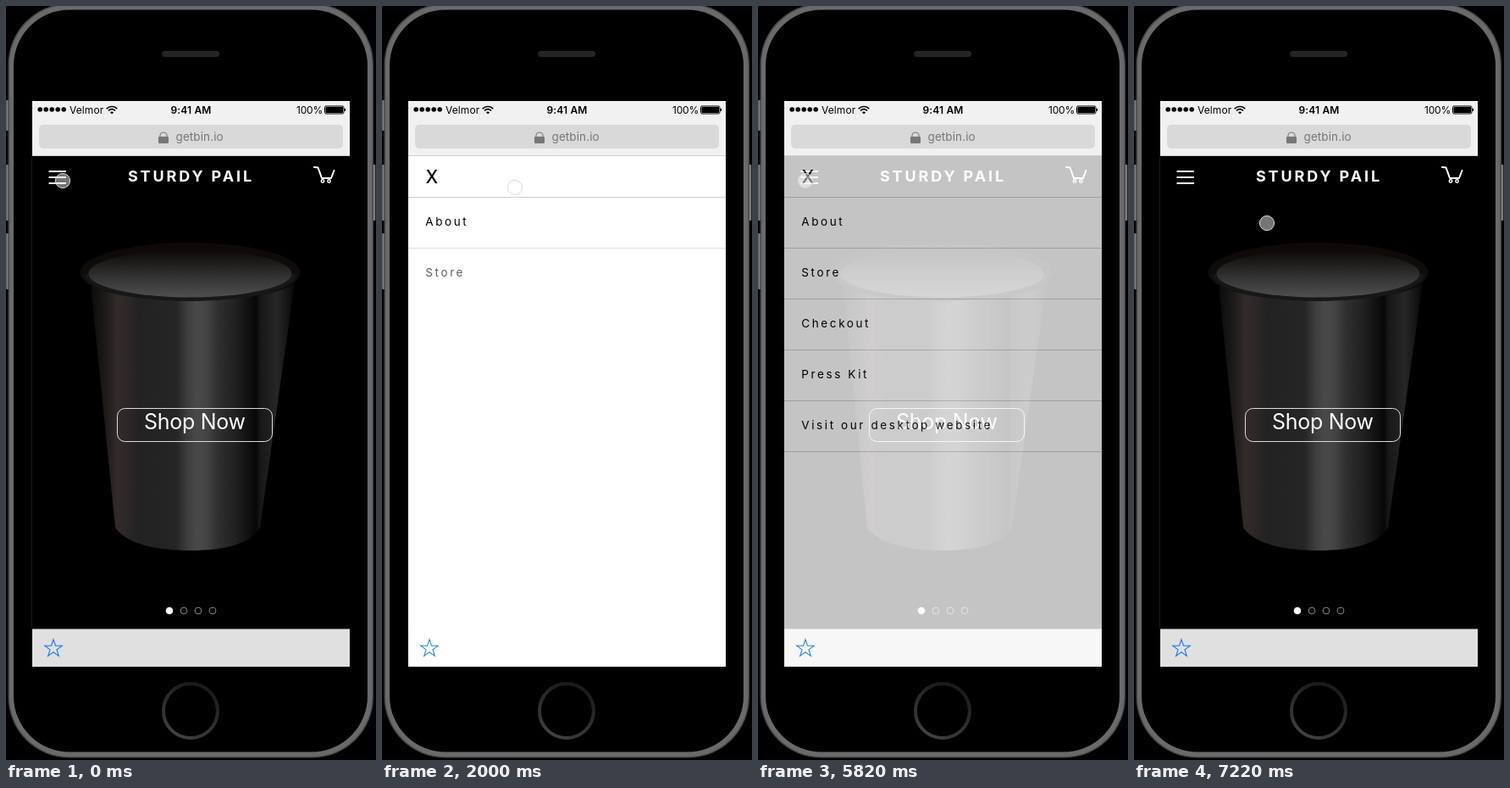
These frames come from a looping animation (437x889 px, 7280 ms). An HTML page with a canvas:

```html
<!DOCTYPE html>
<html lang="en">
<head>
<meta charset="utf-8">
<title>Mobile menu</title>
<style>
html, body { margin: 0; width: 100%; height: 100%; overflow: hidden; background: #000; }
canvas { display: block; width: 437px; height: 889px; }
</style>
</head>
<body>
<canvas id="stage"></canvas>
<script>
const W = 437, H = 889, LOOP = 7280;
const dpr = window.devicePixelRatio || 1;

function prepare(canvas) {
  canvas.width = W * dpr;
  canvas.height = H * dpr;
  const context = canvas.getContext('2d');
  context.scale(dpr, dpr);
  return context;
}

const stage = prepare(document.getElementById('stage'));
const layer = prepare(document.createElement('canvas'));
let ctx = stage;

const SANS = 'Inter, Roboto, sans-serif';
const ITEMS = ['About', 'Store', 'Checkout', 'Press Kit', 'Visit our desktop website'];

const part = (t, start, length) => Math.min(1, Math.max(0, (t - start) / length));
const smooth = p => p * p * (3 - 2 * p);
const cubic = p => p < 0.5 ? 4 * p ** 3 : 1 - 4 * (1 - p) ** 3;
const mix = (a, b, p) => a + (b - a) * p;

function rect(x, y, w, h, color) {
  ctx.fillStyle = color;
  ctx.fillRect(x, y, w, h);
}

function round(x, y, w, h, r, fill, stroke) {
  ctx.beginPath();
  ctx.roundRect(x, y, w, h, r);
  paint(fill, stroke, 1);
}

function circle(x, y, r, fill, stroke, width = 1) {
  ctx.beginPath();
  ctx.arc(x, y, r, 0, Math.PI * 2);
  paint(fill, stroke, width);
}

function oval(x, y, rx, ry, fill) {
  ctx.beginPath();
  ctx.ellipse(x, y, rx, ry, 0, 0, Math.PI * 2);
  paint(fill);
}

function paint(fill, stroke, width) {
  if (fill) { ctx.fillStyle = fill; ctx.fill(); }
  if (stroke) { ctx.strokeStyle = stroke; ctx.lineWidth = width; ctx.stroke(); }
}

function text(str, x, y, size, color, weight = 400, spacing = 0) {
  ctx.font = `${weight} ${size}px ${SANS}`;
  ctx.letterSpacing = spacing + 'px';
  ctx.fillStyle = color;
  ctx.fillText(str, x, y);
}

function gradient(x0, y0, x1, y1, stops) {
  const g = ctx.createLinearGradient(x0, y0, x1, y1);
  for (const [at, color] of stops) g.addColorStop(at, color);
  return g;
}

function phone() {
  rect(0, 0, W, H, '#000');
  const metal = x => gradient(x, 0, x + 4, 0, [[0, '#555'], [0.5, '#8a8a8a'], [1, '#555']]);
  round(0, 111, 4, 36, 1, metal(0));
  round(0, 187, 4, 66, 1, metal(0));
  round(0, 268, 4, 66, 1, metal(0));
  round(432.5, 187, 4, 66, 1, metal(432.5));
  round(2.5, -3, 431.5, 889.5, 72, '#484848');
  round(4, -1.5, 428.5, 886.5, 70.5, '#6a6a6a');
  round(9, 4.5, 418, 875, 66, '#000');
  round(184, 53, 68, 7, 3.5, '#262626');
  circle(218, 831, 32, null,
    gradient(232, 799, 204, 863, [[0, '#191919'], [0.5, '#2b2b2b'], [1, '#414141']]), 4);
}

function browser() {
  rect(31, 112, 375, 64, '#f1f1f1');
  rect(31, 176, 375, 1, '#cacaca');
  for (let i = 0; i < 5; i++) circle(40.2 + i * 7, 122, 2.8, '#000');
  text('Velmor', 75, 126.5, 12, '#000', 400, 0.1);
  text('9:41 AM', 194.5, 126.5, 12, '#000', 600, 0.15);
  text('100%', 343, 126.5, 12, '#000', 400, -0.2);

  // wifi fan
  ctx.save();
  ctx.beginPath();
  ctx.moveTo(125, 127.5);
  ctx.lineTo(116, 118.5);
  ctx.lineTo(116, 114);
  ctx.lineTo(134, 114);
  ctx.lineTo(134, 118.5);
  ctx.clip();
  for (const r of [8.5, 5.3]) circle(125, 127, r, null, '#000', 1.7);
  circle(125, 127, 2.6, '#000');
  ctx.restore();

  round(376.5, 118, 22.5, 9, 1.5, null, '#000');
  rect(377.5, 119, 20.5, 7, '#000');
  rect(399.5, 121, 1.5, 3, '#000');

  round(39, 140, 359, 28, 5, '#d9d9d9');
  round(180, 154, 12, 8, 1, '#777');
  ctx.beginPath();
  ctx.moveTo(182, 155);
  ctx.lineTo(182, 153);
  ctx.arc(186, 153, 4, Math.PI, 0);
  ctx.lineTo(190, 155);
  paint(null, '#777', 1.2);
  text('getbin.io', 200.5, 159.3, 13.5, '#777', 400, 0.1);
}

function star(color) {
  ctx.beginPath();
  for (let i = 0; i < 10; i++) {
    const r = i % 2 ? 4.2 : 10.8, a = i * Math.PI / 5 - Math.PI / 2;
    ctx.lineTo(56 + r * Math.cos(a), 757.6 + r * Math.sin(a));
  }
  ctx.closePath();
  paint(null, color, 1.1);
}

function cup() {
  oval(217.5, 314, 130, 35, gradient(0, 279, 0, 349,
    [[0, '#0f0907'], [0.5, '#0e0c0b'], [1, '#1c1c1c']]));
  ctx.beginPath();
  ctx.moveTo(100, 328);
  ctx.lineTo(129, 615);
  ctx.bezierCurveTo(142, 634, 178, 642, 218, 642);
  ctx.bezierCurveTo(258, 642, 290, 634, 300, 615);
  ctx.lineTo(341, 326);
  ctx.bezierCurveTo(310, 354, 130, 354, 100, 328);
  paint(gradient(100, 0, 341, 0, [
    [0, '#0b0b0b'], [0.08, '#1f1c1b'], [0.13, '#322b29'], [0.18, '#2c2827'],
    [0.24, '#222'], [0.42, '#252525'], [0.47, '#3c3c3c'], [0.52, '#494949'],
    [0.57, '#444'], [0.62, '#303030'], [0.71, '#202020'], [0.77, '#111'],
    [0.81, '#070707'], [0.83, '#171717'], [0.91, '#262626'], [0.96, '#171717'], [1, '#070707']
  ]));
  // front lip over the body
  ctx.save();
  ctx.beginPath();
  ctx.rect(88, 316, 260, 40);
  ctx.clip();
  oval(217.5, 315, 125, 33, '#171717');
  ctx.restore();
  oval(217.5, 315.5, 120, 28, gradient(0, 287, 0, 343,
    [[0, '#0b0807'], [0.3, '#1f1d1c'], [0.65, '#383838'], [1, '#4e4e4e']]));
}

function cart() {
  ctx.lineCap = ctx.lineJoin = 'round';
  ctx.beginPath();
  ctx.moveTo(364, 190);
  ctx.lineTo(368.5, 190.5);
  ctx.lineTo(373, 203);
  ctx.lineTo(384, 203);
  ctx.lineTo(387.5, 194);
  paint(null, '#fff', 2);
  ctx.lineCap = 'butt';
  ctx.lineJoin = 'miter';
  for (const x of [374, 381.5]) circle(x, 206.5, 1.7, null, '#fff', 1.5);
}

function home() {
  rect(31, 176, 375, 559, '#000');
  rect(30, 177, 1, 558, '#151515');
  cup();
  for (const y of [194, 201, 208]) rect(50.5, y, 20.5, 2, '#fff');
  text('STURDY PAIL', 144, 207, 18, '#fff', 700, 2.9);
  cart();
  round(131.5, 474.5, 183, 39, 9, null, '#dcdcdc');
  text('Shop Now', 163, 499, 25, '#fff', 400, -0.3);
  circle(193, 713, 4.3, '#fff');
  for (const x of [210, 227, 244]) circle(x, 713, 3.9, null, '#8a8a8a');
  rect(31, 734.5, 375, 44.5, '#e0e0e0');
  star('#1478f5');
}

function menu(t) {
  rect(31, 176, 375, 603, '#fff');
  rect(31, 176, 375, 1, '#cfcfcf');
  star('#2f86dc');
  text('X', 51.5, 209, 21, '#000', 500);
  for (let i = 0; i < 6; i++) {
    ctx.globalAlpha = smooth(part(t, 1130 + i * 600, 460));
    rect(31, 225 + i * 60, 375, 1, '#cfcfcf');
    if (ITEMS[i]) text(ITEMS[i], 51.3, 259.3 + i * 60, 13.5, '#000', 400, 2.6);
  }
  ctx.globalAlpha = 1;
}

// The menu fades as one flat picture.
function fadeMenu(t, alpha) {
  ctx = layer;
  menu(t);
  ctx = stage;
  ctx.globalAlpha = alpha;
  ctx.drawImage(layer.canvas, 0, 0, W, H);
  ctx.globalAlpha = 1;
}

// start, length, x, y, easing of x, easing of y
const MOVES = [
  [10, 130, 65, 204.5, smooth, smooth],
  [1490, 730, 168, 218, cubic, p => p],
  [2290, 510, 179, 241, cubic, cubic],
  [4160, 680, 55.5, 207, cubic, cubic],
  [4950, 70, 56, 206, smooth, smooth],
  [5915, 345, 157, 256, cubic, cubic]
];

function pointer(t) {
  let x = 67, y = 206;
  for (const [start, length, toX, toY, easeX, easeY] of MOVES) {
    const p = part(t, start, length);
    x = mix(x, toX, easeX(p));
    y = mix(y, toY, easeY(p));
  }
  circle(x, y, 8.5, 'rgba(255,255,255,0.46)');
  circle(x, y, 8.6, null, '#d8d8d8');
}

function draw(now) {
  const t = now % LOOP;
  phone();
  home();
  browser();
  const shown = smooth(part(t, 760, 550)) * (1 - smooth(part(t, 5615, 660)));
  if (shown > 0) fadeMenu(t, shown);
  pointer(t);
  requestAnimationFrame(draw);
}
requestAnimationFrame(draw);
</script>
</body>
</html>
```
